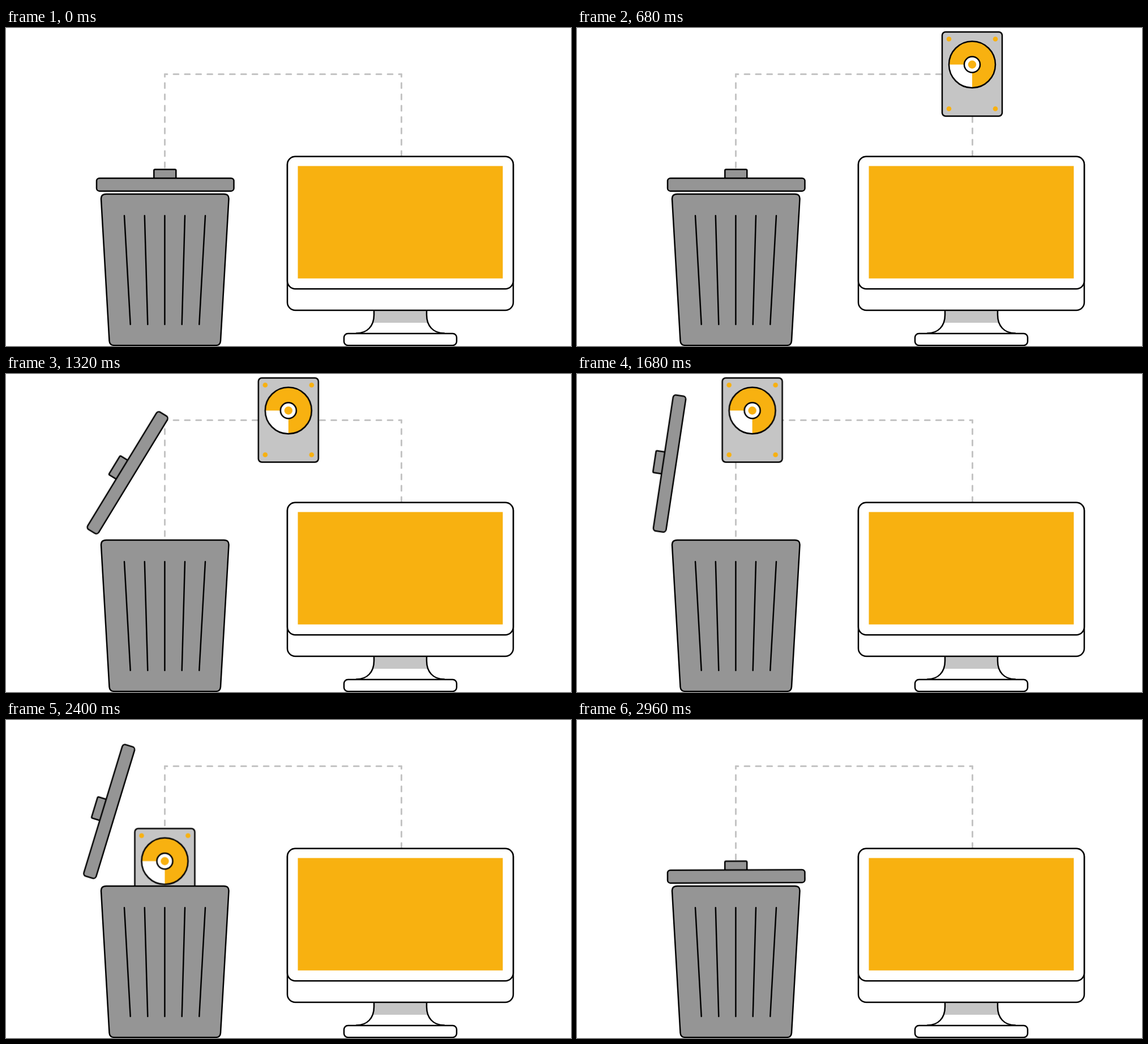
An HTML page for the animation above (3 s loop, 998 by 561 pixels).

```html
<!DOCTYPE html>
<html lang="en">
<head>
<meta charset="utf-8">
<title>Drive to bin</title>
<style>
  html, body { margin: 0; width: 100%; height: 100%; overflow: hidden; background: #fff; }
  svg { display: block; width: 998px; height: 561px; }

  .line { stroke: #000; stroke-width: 2.5; stroke-linecap: round; stroke-linejoin: round; }
  .none { fill: none; }
  .white { fill: #fff; }
  .light { fill: #c5c5c5; }
  .dark { fill: #959595; }
  .accent { fill: #f8b110; }
  .route { fill: none; stroke: #c4c4c4; stroke-width: 3; stroke-linecap: round; stroke-dashoffset: 4.4; }

  .drive { animation: drive 3s infinite; }
  .lid { transform-origin: 157px 284.6px; animation: lid 3s infinite; }

  /* up out of the screen, across, down into the bin */
  @keyframes drive {
    0% { transform: translate(698px, 232px); animation-timing-function: cubic-bezier(.333, 0, .667, 1); }
    22.667% { transform: translate(698px, 0); }
    27.333% { transform: translate(698px, 0); animation-timing-function: cubic-bezier(.4, 0, .7, .46); }
    44% { transform: translate(499.5px, 0); animation-timing-function: cubic-bezier(.3, .51, .65, 1); }
    62% { transform: translate(280.5px, 0); }
    66.667% { transform: translate(280.5px, 0); animation-timing-function: cubic-bezier(.333, 0, .667, 1); }
    92.667%, 100% { transform: translate(280.5px, 354px); }
  }

  @keyframes lid {
    0% { transform: translate(0, 0) rotate(0deg); }
    23.333% { transform: translate(0, 0) rotate(0deg); animation-timing-function: cubic-bezier(.4, 0, .7, .7); }
    44% { transform: translate(0, 0) rotate(-58.5deg); animation-timing-function: cubic-bezier(.3, .52, .6, 1); }
    58.667% { transform: translate(-4px, -2.6px) rotate(-82.2deg); }
    75.333% { transform: translate(-4px, -2.6px) rotate(-82.2deg); animation-timing-function: cubic-bezier(.42, 0, .75, .6); }
    85.333% { transform: translate(0, 0) rotate(-45deg); animation-timing-function: cubic-bezier(.25, .485, .45, 1); }
    100% { transform: translate(0, 0) rotate(0deg); }
  }
</style>
</head>
<body>
<svg viewBox="0 0 998 561">
  <g class="route">
    <path stroke-dasharray="8.8 11.1" d="M280.5 81.5H698.5"/>
    <path stroke-dasharray="8.8 11.2" d="M280.5 81.5V288M698.5 81.5V230"/>
  </g>

  <g class="drive">
    <rect class="line light" x="-53" y="7" width="106" height="148.5" rx="6"/>
    <g class="accent">
      <circle cx="-41" cy="19.5" r="4.3"/>
      <circle cx="41" cy="19.5" r="4.3"/>
      <circle cx="-41" cy="142.5" r="4.3"/>
      <circle cx="41" cy="142.5" r="4.3"/>
      <circle cy="64.5" r="41"/>
    </g>
    <path class="white" d="M0 64.5V105.5A41 41 0 0 1 -41 64.5Z"/>
    <circle class="line none" cy="64.5" r="41"/>
    <circle class="line white" cy="64.5" r="14"/>
    <circle class="accent" cy="64.5" r="7.2"/>
  </g>

  <g class="lid">
    <rect class="line dark" x="261.3" y="249.5" width="39" height="18" rx="2"/>
    <rect class="line dark" x="160" y="265" width="242.5" height="22.7" rx="5"/>
  </g>

  <g class="line">
    <path class="dark" d="M177 293H385Q394 293 393.5 302L379 552Q378.5 560 370.5 560H191.5Q183 560 182.5 552L168 302Q167.5 293 177 293Z"/>
    <path class="none" d="M209 331L219.7 523M244.8 331L250.3 523M280.4 331V523M316 331L310.7 523M352 331L341.3 523"/>
  </g>

  <path class="light" d="M650 498V506Q650 513 647.5 520H745.5Q743 513 743 506V498Z"/>
  <path class="line none" d="M650 498V506C650 526 638 538.5 619 538.5M743 498V506C743 526 755 538.5 774 538.5"/>
  <g class="line white">
    <rect x="597" y="539" width="199" height="21" rx="7"/>
    <rect x="497" y="227" width="399" height="271" rx="14"/>
    <rect x="497" y="226.7" width="399" height="233.5" rx="14"/>
  </g>
  <rect class="accent" x="515.5" y="243.5" width="362" height="198.3"/>
</svg>
</body>
</html>
```
